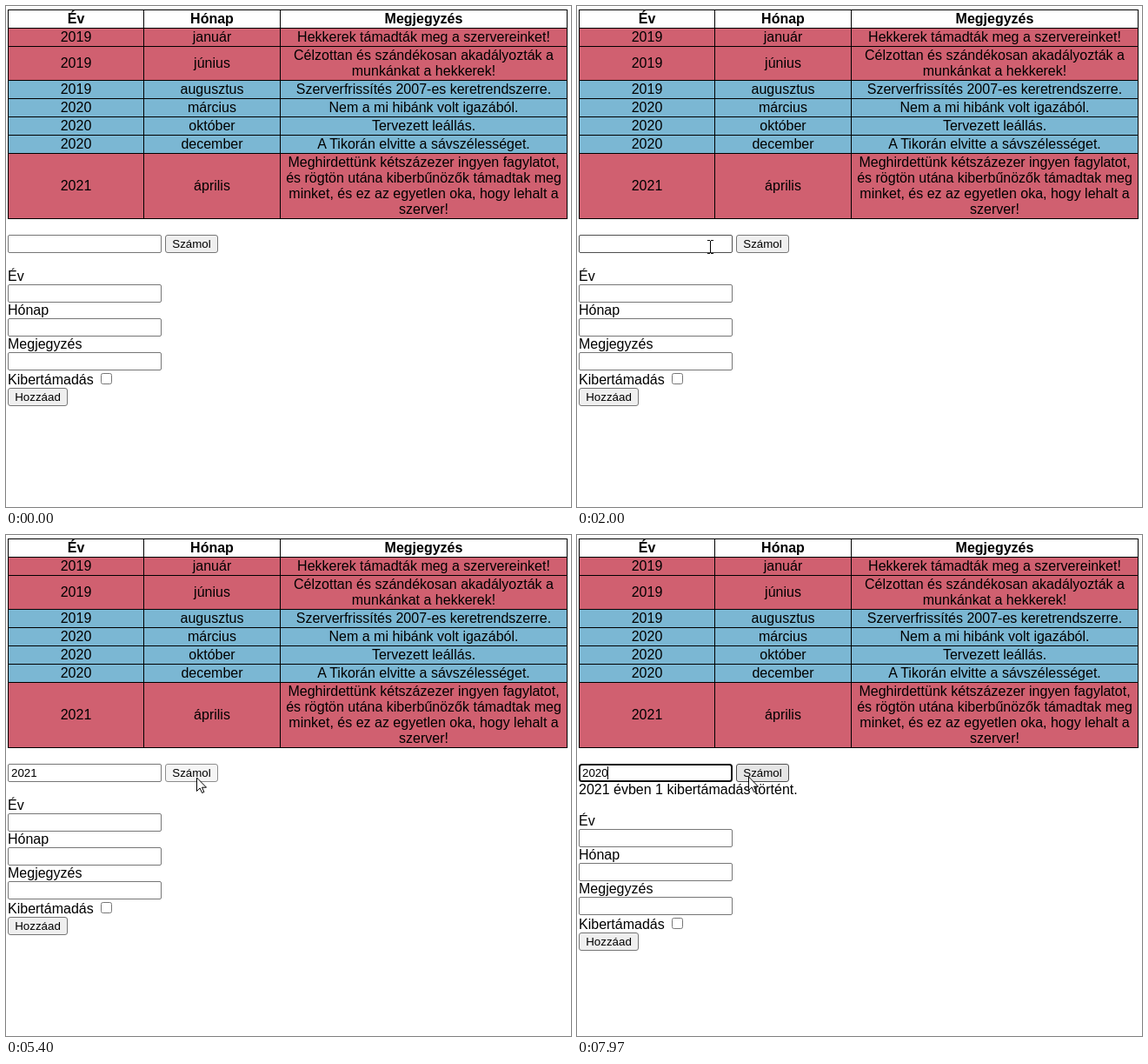
These frames come from a looping animation (650x576 px, 8000 ms). An HTML page:

```html
<!DOCTYPE html>
<html lang="hu">
<head>
<meta charset="utf-8">
<title>Leállások</title>
<style>
html, body { margin: 0; height: 100%; overflow: hidden; background: #fff; }
svg { display: block; font: 16px "Liberation Sans", Arial, sans-serif; }
.small { font-size: 13.333px; }
.mid { text-anchor: middle; }
.bold { font-weight: bold; }
.box { fill: #fff; stroke: #767676; }
.button { fill: #efefef; stroke: #767676; }
.hover { stroke: #4f4f4f; }
.button.hover { fill: #e5e5e5; }
.button.active { fill: #f5f5f5; stroke: #8d8d8d; }
.box.focus { stroke: #101010; stroke-width: 2; }
</style>
</head>
<body>
<svg id="stage" width="650" height="576" viewBox="0 0 650 576">
  <g id="table"><rect x="2" y="4" width="644" height="241"/></g>
  <rect id="query" class="box" rx="1.5"/>
  <text id="typed" class="small" x="6" y="278"></text>
  <rect id="caret" y="266" width="1" height="15"/>
  <rect id="count" class="button" x="183.5" y="263.5" width="60" height="20" rx="2.5"/>
  <text class="small mid" x="213.5" y="278">Számol</text>
  <text id="result" x="2" y="298">2021 évben 1 kibertámadás történt.</text>
  <g id="form">
    <text x="2" y="435">Kibertámadás</text>
    <rect class="box" x="109.5" y="422.5" width="12" height="12" rx="2"/>
    <rect class="button" x="2.5" y="439.5" width="68" height="20" rx="2.5"/>
    <text class="small mid" x="36.5" y="454">Hozzáad</text>
  </g>
  <path id="arrow" fill="#fff" stroke="#000" d="M.5 1v15.5l3.6-3.5 2.5 5.5 2.3-1-2.4-5.3h5z"/>
  <path id="beam" stroke="#000" fill="none" d="M-3-7.5h3m1 0h3M.5-7V7M-3 7.5h3m1 0h3"/>
</svg>
<script>
const $ = id => document.getElementById(id);

function add(parent, tag, attrs, text = '') {
  const el = document.createElementNS('http://www.w3.org/2000/svg', tag);
  for (const name in attrs) el.setAttribute(name, attrs[name]);
  el.textContent = text;
  parent.append(el);
}

const RED = '#d06070', BLUE = '#7bb7d3';
const rows = [
  ['#fff', 'Év', 'Hónap', 'Megjegyzés'],
  [RED, '2019', 'január', 'Hekkerek támadták meg a szervereinket!'],
  [RED, '2019', 'június', 'Célzottan és szándékosan akadályozták a|munkánkat a hekkerek!'],
  [BLUE, '2019', 'augusztus', 'Szerverfrissítés 2007-es keretrendszerre.'],
  [BLUE, '2020', 'március', 'Nem a mi hibánk volt igazából.'],
  [BLUE, '2020', 'október', 'Tervezett leállás.'],
  [BLUE, '2020', 'december', 'A Tikorán elvitte a sávszélességet.'],
  [RED, '2021', 'április', 'Meghirdettünk kétszázezer ingyen fagylatot,|és rögtön utána kiberbűnözők támadtak meg|minket, és ez az egyetlen oka, hogy lehalt a|szerver!']
];
const columns = [[3, 155], [159, 156], [316, 329]];

let rowTop = 5;
rows.forEach(([fill, ...cells], r) => {
  const height = 2 + 18 * cells[2].split('|').length;
  cells.forEach((cell, c) => {
    const [x, width] = columns[c], lines = cell.split('|');
    add($('table'), 'rect', { x, y: rowTop, width, height, fill });
    lines.forEach((line, i) => add($('table'), 'text', {
      class: r ? 'mid' : 'mid bold',
      x: x + width / 2,
      y: rowTop + height / 2 - 9 * lines.length + 14 + 18 * i
    }, line));
  });
  rowTop += height + 1;
});

['Év', 'Hónap', 'Megjegyzés'].forEach((label, i) => {
  add($('form'), 'text', { x: 2, y: 316 + 39 * i }, label);
  add($('form'), 'rect', { class: 'box', x: 2.5, y: 320.5 + 39 * i, width: 176, height: 20, rx: 1.5 });
});

// Pointer: time, x, y
const pointerPath = [
  [490, 574, 562], [970, 375, 467], [1250, 284, 393], [1300, 278, 387],
  [1650, 196, 319], [2000, 153, 277], [2610, 153, 277], [2700, 154, 280],
  [2890, 155, 281], [2980, 157, 284], [3120, 161, 288], [4330, 161, 288],
  [4600, 179, 294], [5130, 221, 280], [5170, 219, 278], [5970, 219, 278],
  [6050, 182, 277], [6340, 165, 278], [6620, 165, 278], [6660, 165, 280],
  [7550, 165, 280], [7970, 197, 277], [8000, 197, 277]
];
const PRESS = 5400, RELEASE = 5500;
const entries = [
  { focus: 2610, blur: PRESS, clear: RELEASE, text: '2021', keys: [3360, 3680, 4100, 4330] },
  { focus: 6620, blur: 8000, clear: 8000, text: '2020', keys: [6850, 7130, 7360, 7550] }
];

function pointerAt(t) {
  const i = Math.max(1, pointerPath.findIndex(p => p[0] > t));
  const [t0, x0, y0] = pointerPath[i - 1], [t1, x1, y1] = pointerPath[i];
  const k = (t - t0) / (t1 - t0);
  return [Math.round(x0 + (x1 - x0) * k), Math.round(y0 + (y1 - y0) * k)];
}

const show = (id, on) => $(id).setAttribute('display', on ? 'inline' : 'none');

function draw(t) {
  const [x, y] = pointerAt(t);
  const visible = t >= pointerPath[0][0];
  const inRow = visible && y >= 263 && y < 284;
  const beam = inRow && x < 183;
  for (const id of ['arrow', 'beam']) $(id).setAttribute('transform', `translate(${x} ${y})`);
  show('arrow', visible && !beam);
  show('beam', beam);

  const entry = entries.find(e => t >= e.focus && t < e.clear);
  const focused = entry && t < entry.blur;
  const typed = entry ? entry.keys.filter(k => k <= t) : [];
  $('typed').textContent = entry ? entry.text.slice(0, typed.length) : '';
  $('caret').setAttribute('x', Math.floor(6 + 7.415 * typed.length));
  show('caret', focused && t - (typed.at(-1) ?? entry.focus) < 510);

  const inset = focused ? 1 : 0.5;
  const frame = { x: 2 + inset, y: 263 + inset, width: 177 - 2 * inset, height: 21 - 2 * inset, rx: focused ? 2.5 : 1.5 };
  for (const name in frame) $('query').setAttribute(name, frame[name]);
  $('query').setAttribute('class', 'box' + (focused ? ' focus' : inRow && x < 179 ? ' hover' : ''));

  const active = t >= PRESS && t < RELEASE;
  $('count').setAttribute('class', 'button' + (active ? ' active' : inRow && x >= 183 && x < 244 ? ' hover' : ''));

  const done = t >= RELEASE;
  show('result', done);
  $('form').setAttribute('transform', `translate(0 ${done ? 18 : 0})`);
}

const start = performance.now();
function tick() {
  draw((performance.now() - start) % 8000);
  requestAnimationFrame(tick);
}
tick();
</script>
</body>
</html>
```
